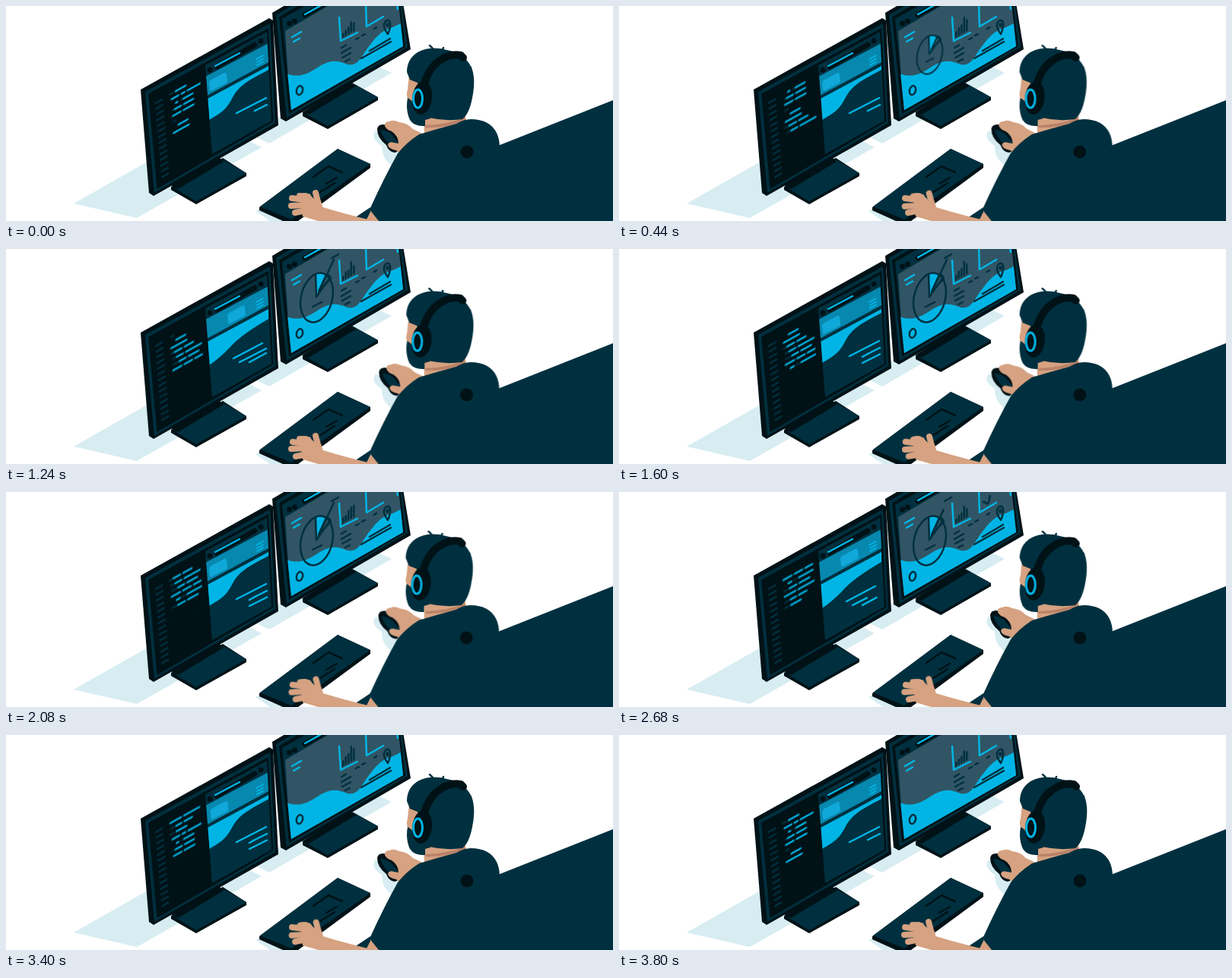
Write an HTML page without scripts that moves like this. It is 798 px wide and 283 px high and loops after 3840 ms.

```html
<!DOCTYPE html>
<html lang="en">
<head>
<meta charset="utf-8">
<title>Developer at work</title>
<style>
  html, body { margin: 0; width: 100%; height: 100%; overflow: hidden; background: #fff; }
  svg { display: block; width: 100vw; height: 100vh; }
  .navy { fill: #00303f; }
  .ink { fill: #011217; }
  .cyan { fill: #00b5e5; }
  .skin { fill: #d6a281; }
  .shade { fill: #d7edf2; }
  .line { fill: none; stroke-width: 2.5; stroke-linecap: round; stroke-linejoin: round; }
  .thick { stroke-width: 7; }
  .s-cyan { stroke: #00b5e5; }
  .s-navy { stroke: #00303f; }
  .s-ink { stroke: #011217; }
  .s-skin { stroke: #d6a281; }

  .anim { animation: 3840ms linear infinite; }
  .code { animation-name: scroll; animation-timing-function: steps(16); animation-delay: -40ms; }
  .cover { animation-name: cover; animation-timing-function: step-end; }
  .card { animation-name: card; animation-timing-function: ease-in-out; }
  .wave { animation-name: wave; animation-timing-function: ease-in-out; }
  .copy-a { animation-name: copyA; animation-timing-function: step-end; }
  .copy-b { animation-name: copyB; animation-timing-function: step-end; }
  .type { stroke-dasharray: 50; }
  .t1 { animation-name: type1; }
  .t2 { animation-name: type2; }
  .extra { animation-name: extra; animation-timing-function: step-end; }
  .pie { animation-name: pie; animation-timing-function: ease-in-out; transform-origin: 408px 64px; }
  .leader { stroke-dasharray: 62; animation-name: leader; }
  .trend { stroke-dasharray: 17 80; stroke-dashoffset: 18; animation-name: trend; }
  .bar { transform-box: fill-box; transform-origin: bottom; animation: bar 640ms ease-in-out infinite alternate; }
  .bar:nth-child(even) { animation-duration: 480ms; }
  .head { animation-name: head; animation-timing-function: ease-in-out; }
  .body { animation-name: body; animation-timing-function: ease-in-out; }
  .mouse { animation-name: mouse; animation-timing-function: ease-in-out; }
  .finger { animation: tap 320ms ease-in-out infinite alternate; }
  .finger:nth-child(even) { animation-duration: 240ms; }

  @keyframes scroll { to { transform: translateY(-116.8px); } }
  @keyframes cover {
    0% { transform: translateY(0); }
    32% { transform: translateY(-7.3px); }
    48% { transform: translateY(-14.6px); }
    75% { transform: translateY(-7.3px); }
    92%, 100% { transform: translateY(0); }
  }
  @keyframes card {
    0%, 13%, 40%, 61%, 90%, 100% { transform: none; }
    19%, 32%, 68%, 82% { transform: translate(24px, -13.3px); }
  }
  @keyframes wave {
    0%, 13%, 40%, 61%, 90%, 100% { d: path("M265 122L345 79V84C315 100 306 105 297 122C289 138 280 142 267 150Z"); }
    19%, 32%, 68%, 82% { d: path("M265 122L345 79V92C320 107 304 118 293 131C285 139 276 147 267 153Z"); }
  }
  @keyframes copyA { 0%, 36% { opacity: 1; } 16%, 64.5% { opacity: 0; } 86%, 100% { opacity: 1; } }
  @keyframes copyB { 0%, 36% { opacity: 0; } 16%, 64.5% { opacity: 1; } 86%, 100% { opacity: 0; } }
  @keyframes type1 {
    0%, 16%, 50%, 64% { stroke-dashoffset: 50; }
    21%, 49.9%, 68%, 100% { stroke-dashoffset: 0; }
  }
  @keyframes type2 {
    0%, 19%, 50%, 66% { stroke-dashoffset: 50; }
    28%, 49.9%, 75%, 100% { stroke-dashoffset: 0; }
  }
  @keyframes extra { 0% { opacity: 0; } 38% { opacity: 1; } 90%, 100% { opacity: 0; } }
  @keyframes pie {
    0%, 4% { transform: scale(0); }
    15%, 80% { transform: none; }
    88%, 100% { transform: scale(0); }
  }
  @keyframes leader {
    0%, 15% { stroke-dashoffset: 62; }
    26%, 65% { stroke-dashoffset: 0; }
    77%, 100% { stroke-dashoffset: 62; }
  }
  @keyframes trend {
    0%, 15% { stroke-dashoffset: 18; }
    38% { stroke-dashoffset: -50; }
    38.1%, 60% { stroke-dashoffset: 18; }
    86%, 100% { stroke-dashoffset: -50; }
  }
  @keyframes bar { to { transform: scaleY(1.4); } }
  @keyframes head {
    0%, 88%, 100% { transform: none; }
    23% { transform: translate(-1px, 0); }
    42% { transform: translate(-.4px, 0); }
    54% { transform: translate(-1.5px, 0); }
    70% { transform: translate(-.3px, 0); }
  }
  @keyframes body {
    0%, 74%, 100% { transform: none; }
    23%, 54% { transform: translate(-.7px, 0); }
    40% { transform: translate(-.2px, 0); }
  }
  @keyframes mouse {
    0%, 70%, 100% { transform: none; }
    23% { transform: translate(3px, 0); }
    42%, 54% { transform: translate(1.5px, .5px); }
  }
  @keyframes tap { to { transform: translate(1px, 1px); } }
</style>
</head>
<body>
<svg viewBox="0 0 798 283" preserveAspectRatio="none">
  <defs>
    <clipPath id="codeClip"><path d="M0 8H73V67H0Z"/></clipPath>
    <clipPath id="siteClip"><path d="M262 78L343 34L349 151L271 195Z"/></clipPath>
    <clipPath id="dashClip"><path d="M363 17L400-4H516L522 53L375 137Z"/></clipPath>
    <g id="rows" class="line">
      <path class="s-navy" d="M26 12h4M40 26.6h3M28 33.9h3M28 48.5h3M27 63.1h1M26 70.4h4M28 77.7h3M28 85h5M40 99.6h4M27 106.9h4M27 121.5h4"/>
      <path class="s-cyan" d="M34 12h13M28 19.3h9M41 19.3h4M49 19.3h16M33 26.6h2M43 26.6h12M31 33.9h8M43 33.9h12M28 41.2h10M42 41.2h13M34 55.8h12M27 63.1h20M31 70.4h9M44 70.4h11M33 77.7h8M45 77.7h20M36 85h8M48 85h13M27 92.3h11M42 92.3h10M56 92.3h9M33 99.6h4M47 99.6h18M34 106.9h9M47 106.9h13M27 114.2h14M45 114.2h20M34 121.5h7M45 121.5h10"/>
    </g>
  </defs>

  <!-- desk shadows -->
  <path class="shade" d="M89 260L184 206L250 168L320 178L336 186L172 279ZM320 168L346 181L507 88L490 80ZM328 270L340 264L375 283H347ZM486 164Q478 174 494 184Q494 202 509 211L525 190Z"/>

  <!-- left monitor -->
  <path class="ink" d="M217 238L285 200L316 220V224L250 261L217 242Z"/>
  <path class="navy" d="M222 240L286 203L316 220L250 257Z"/>
  <path class="ink" d="M217 236L280 199L286 205L226 241Z"/>
  <path class="ink" d="M177 110L346 16L351 19L358 157L194 250L188 246Z"/>
  <path class="navy" d="M183 113L347 23L354 154L195 246Z"/>
  <path class="ink" d="M187 115.500L345 29L351.500 152L198.500 241Z"/>
  <g transform="matrix(1 -.555 .085 1 188 119)">
    <path class="line s-navy" d="M8 13h8m-8 7.5h8m-8 7.5h8m-8 7.5h8m-8 7.5h8m-8 7.5h8m-8 7.5h8m-8 7.5h8m-8 7.5h8m-8 7.5h8m-8 7.5h8m-8 7.5h8m-8 7.5h8m-8 7.5h8"/>
    <g clip-path="url(#codeClip)">
      <g class="anim code">
        <use href="#rows"/>
        <use href="#rows" y="116.8"/>
      </g>
      <path class="ink anim cover" d="M22 67H73V90H22Z"/>
    </g>
  </g>

  <g clip-path="url(#siteClip)">
    <path class="navy" d="M260 70L350 20V160L268 200Z"/>
    <path class="line s-ink thick" d="M277 80L327 51M268 84h.1M335 46h.1"/>
    <path class="line s-cyan" d="M275 79L307 62"/>
    <path fill="#0788af" d="M262 93L345 49V74L264 118Z"/>
    <path class="cyan anim wave" d="M265 122L345 79V84C315 100 306 105 297 122C289 138 280 142 267 150Z"/>
    <path class="anim card" fill="#10a8d8" d="M270 97L287 88Q290 87 290 90L291 99Q291 101 289 102L271 111Q268 113 268 110L267 101Q267 99 270 97Z"/>
    <path class="line s-cyan" style="stroke-width:1.7" d="M329 70L338 65M330 74L338 69.500M330 78L338 73.500"/>
    <g class="line s-cyan">
      <g class="anim copy-a">
        <path d="M303 141L342 121M327 138L343 130"/>
        <path class="anim extra" d="M320 142L327 138M320 150L343 138.500"/>
      </g>
      <g class="anim copy-b">
        <path class="anim type t1" d="M299 144L337 124"/>
        <path class="anim type t2" d="M307 149L342 131"/>
        <path class="anim type t2" d="M320 149L342 137"/>
      </g>
    </g>
  </g>

  <!-- right monitor -->
  <path class="ink" d="M390 141L455 101L489 120V124L423 162L390 145Z"/>
  <path class="navy" d="M394 142L456 102L489 120L423 158Z"/>
  <path class="ink" d="M389 140L452 101L461 105L398 143Z"/>
  <path class="ink" d="M350 9L372-4H522L532 57L368 152L361 148Z"/>
  <path class="navy" d="M355 12L382-4H520L528 54L369 147Z"/>
  <path class="ink" d="M359 14.500L390-4H518L525 53.500L372 142Z"/>
  <g clip-path="url(#dashClip)">
    <path class="navy" d="M360-4H530V140H360Z"/>
    <path class="line s-ink thick" d="M372.500 23h.1M379.500 20h.1M393 12L426-7"/>
    <path class="line s-cyan" d="M393 11L418-3"/>
    <path fill="#315564" d="M367 33L430-4H530V140H374Z"/>
    <path class="cyan" d="M369 89C385 95 396 90 411 80C430 69 437 73 449 77C464 80 468 64 478 52C488 38 495 33 505 29C514 26 519 23 524 18V60L375 140Z"/>
    <path class="line s-cyan" d="M376 41L388 34M378 47L386 42.500M438 15L440 46L462 35M473-3L474 27L496 14M514-3L515 4"/>
    <g class="navy">
      <path class="bar" d="M442 36l2.500-1v6l-2.500 1Z"/>
      <path class="bar" d="M445.500 32l2.500-1v8l-2.500 1Z"/>
      <path class="bar" d="M449 28l2.500-1v10l-2.500 1Z"/>
      <path class="bar" d="M452.500 21l2.500-1v15l-2.500 1Z"/>
      <path class="bar" d="M456 22l2.500-1v12l-2.500 1Z"/>
    </g>
    <g class="line s-navy">
      <path d="M441 55L447 51.500M441 62L453 55M442 68L453 62M446 73L452 70M460 44L464 42M468 39L472 37M484 30L487 28M467 69L506 47M478 59L505 43"/>
      <path d="M502 37Q496 29 497 24Q499 18 503 19Q506 22 505 27Q504 33 502 37Z"/>
      <ellipse cx="501.500" cy="25" rx="1" ry="1.500"/>
      <ellipse cx="386" cy="111" rx="4" ry="6" transform="rotate(16 386 111)"/>
      <path class="anim trend" d="M478 21C479 3 483 22 486 13S486 3 490-8"/>
      <g class="anim pie">
        <path class="cyan" stroke="none" d="M408 63L407 33Q416 30 421 34L411 57Z"/>
        <ellipse cx="408.500" cy="64" rx="20.500" ry="33" transform="rotate(14 408.500 64)"/>
        <path d="M407 33L408 63L425 39M403 76L415 70"/>
        <path d="M411 56L421 34Q425 33 427 39Z"/>
      </g>
      <path class="anim leader" d="M411 57L431 14M428 12L437 7"/>
    </g>
  </g>

  <!-- keyboard -->
  <path class="ink" d="M333 265L436 188L479 208V213L384 283H364L333 269Z"/>
  <path class="navy" d="M334 264L436 188L479 208L375 281Z"/>
  <path class="line s-ink" d="M404 225L424 211L442 219M421 234L435 226M413 245L432 233"/>

  <!-- mouse -->
  <g class="anim mouse">
    <path class="ink" d="M488 162Q489 155 497 156L506 158L521 177Q520 191 511 193Q503 192 500 183Q488 174 488 162Z"/>
    <path class="navy" d="M492 163Q498 163 506 168L516 180L509 186Q496 176 492 163Z"/>
    <path class="skin" d="M498 158Q497 152 504 152Q509 149 517 153Q528 154 535 162L552 170L524 199L513 190Q502 188 502 182Q504 178 510 180L516 181Q516 171 507 165Q500 163 498 158Z"/>
  </g>

  <!-- typing hand -->
  <path class="navy" d="M452 283L479 265L480 283Z"/>
  <path class="skin" d="M473 283L480 269L492 283ZM386 247Q397 244 402 251L417 265Q443 273 480 282V284H414L390 277Z"/>
  <g class="line s-skin" style="stroke-width:8">
    <path class="finger" d="M386 250L397 251"/>
    <path class="finger" d="M376 253L393 255"/>
    <path class="finger" d="M375 263L393 262"/>
    <path class="finger" d="M380 272L395 269"/>
    <path class="finger" d="M407 246Q409 255 412 263"/>
  </g>

  <!-- chair and torso -->
  <path class="navy" d="M600 202.500L798 124V283H560Z"/>
  <path class="skin" d="M549 145L603 140L606 155L575 173L550 168Z"/>
  <path fill="#b98268" d="M552 157Q582 156 602 147L605 150Q580 161 551 160Z"/>
  <g class="anim body">
    <path class="navy" d="M543 169Q566 162 592 155Q602 149 611 149Q636 149 645 167Q649 175 649 187L640 283H490L478 268Q497 226 515 194Q526 180 543 169Z"/>
    <circle class="ink" cx="606" cy="192" r="8.500"/>
  </g>

  <!-- head -->
  <g class="anim head">
    <path class="skin" d="M530 90L528 110Q525 119 530 126L548 139L552 100Z"/>
    <path class="navy" d="M528 121Q534 124 538 132L546 120L558 135V148L551 150V158Q537 159 531 150Q525 137 528 121Z"/>
    <path class="navy" d="M527 87Q527 70 541 61Q558 52 580 58Q603 62 612 81Q618 96 613 121Q609 142 600 149Q578 152 556 147L541 101L531 97Z"/>
    <path class="line s-navy" d="M557 52Q560 54 562 58M573 60L575 55M603 78Q607 82 611 81"/>
    <path class="line s-ink" style="stroke-width:10" d="M549 106Q555 82 570 72Q584 62 598 65L601 68"/>
    <ellipse class="ink" cx="547" cy="121" rx="13" ry="22" transform="rotate(7 547 121)"/>
    <ellipse class="line s-cyan" style="stroke-width:3" cx="541.500" cy="122" rx="6" ry="12"/>
  </g>
</svg>
</body>
</html>
```
